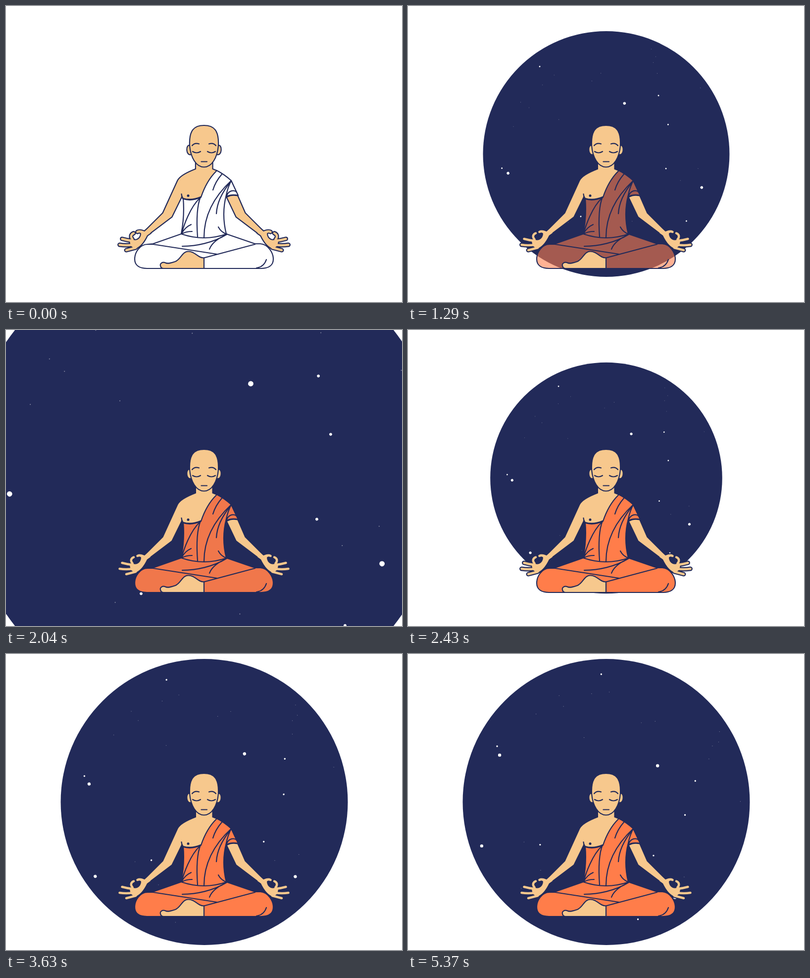
These frames come from a looping animation (800x600 px, 5400 ms). An HTML page:

```html
<!DOCTYPE html>
<html lang="en">
<head>
<meta charset="utf-8">
<title>Meditation</title>
<style>
html, body { margin: 0; width: 100%; height: 100%; overflow: hidden; background: #fff; }
svg { display: block; width: 800px; height: 600px; stroke-linecap: round; stroke-linejoin: round; }
.line { fill: none; stroke: #222a59; stroke-width: 2.2; }
.skin { fill: #f7c88d; stroke: #222a59; stroke-width: 2.2; }
</style>
</head>
<body>
<svg viewBox="0 0 800 600">
  <defs>
    <path id="palm" d="M286 452 L280 457 Q272 454 267 456.500 L273 461 Q273 470 265 474 Q258 476 254 472 L250 477 L252 486 L260 492 Q274 488 285 465 L292 460Z"/>
    <g id="limbs">
      <path d="M384 316 V331 Q353 343 347.500 354 L317.500 420 L281 456.500 L285 464.500 L334.500 427 L354 387 L355 381 L358 390 Q375 395 393 387 Q404 354 424 334 L416.500 331 V316Z"/>
      <path d="M447 388 Q456 383 467.500 385.500 L482.500 420 L519 456.500 L515 464.500 L465.500 427Z"/>
      <use href="#palm"/>
      <use href="#palm" transform="matrix(-1 0 0 1 800 0)"/>
    </g>
    <path id="hand" d="M265.500 458 Q271 455 279 460 M258 460.500 C251.500 463 251.500 469 255.500 473 M256 476 Q245 475 234.500 472 M256 484 Q243 486 229.500 484 M262 490 L243 495"/>
    <g id="fingers" fill="none">
      <use href="#hand"/>
      <use href="#hand" transform="matrix(-1 0 0 1 800 0)"/>
    </g>
    <path id="ear" d="M373 283 C367 280.500 365 286 365.300 292 C365.700 298 369 303 374 301"/>
    <path id="face" d="M376 283 Q381 276.500 390 279.500 M377 295 Q385 300 393 295"/>
    <path id="robe" d="M425 333 Q441 341 455 354 L469 384 Q456 381 446 386 L445 383 Q435 422 445 462 L503 482 L514 482 C530 483 540 501 540 513 C540 526 530 532 515 532 H285 C270 532 260 526 260 513 C260 500 270 483 286 483 L297 482 L354 462 Q361 425 358 390 Q375 395 393 387 Q404 353 425 333Z"/>
  </defs>

  <g id="sky">
    <circle r="290" fill="#222a59"/>
    <g id="stars" fill="#fff"></g>
  </g>

  <use id="cloth" href="#robe" fill="#ff7d4a"/>
  <g class="line">
    <use href="#robe"/>
    <path d="M436 341 Q423 356 418 373 M455 354 C425 382 400 420 400 469 M393 387 C385 407 385 440 387 468"/>
    <path d="M454 356 C436 378 426 400 425 421 M455 354 Q448 368 445 383 M446 384 C450 374 460 372 466 377"/>
    <path d="M391 390 C372 408 359 445 355 461 M374 443 Q362 448 355 461 M376 457 Q363 457 355 462 M429 448 Q434 458 445 462"/>
    <path d="M354 462 Q400 478 446 462 M356 487 C384 487 418 480 446 463 M411 493 Q417 476 446 463"/>
    <path d="M286 483 L297 483 L426 503 M503 483 L400 510.500 M526 514 Q521 529 506 531"/>
  </g>
  <path class="skin" d="M400 532 V510.500 C387 511 383 497.500 368 497.500 C356 497.500 353 514 342 518 C333 521 326 523 322 520.500 C316 518 310.500 522 312 526.500 Q313 532 318 532Z"/>

  <g stroke="#222a59" fill="#222a59">
    <use href="#limbs" stroke-width="4.400"/>
    <use href="#fingers" stroke-width="8.900"/>
  </g>
  <g fill="#f7c88d">
    <use href="#limbs"/>
    <use href="#fingers" stroke="#f7c88d" stroke-width="4.500"/>
  </g>
  <path class="line" d="M354.500 381 Q355 387 358 390 Q375 395 393 387"/>
  <circle cx="368" cy="384.500" r="2.500" fill="#222a59"/>

  <g class="skin">
    <use href="#ear"/>
    <use href="#ear" transform="matrix(-1 0 0 1 800 0)"/>
    <path d="M371 283 C369.500 252 380 242 400 242 C420 242 430.500 252 429 283 C427 307 416 326.500 400 326.500 C384 326.500 373 307 371 283Z"/>
  </g>
  <g class="line">
    <use href="#face"/>
    <use href="#face" transform="matrix(-1 0 0 1 800 0)"/>
    <path d="M394.500 315.500 H406"/>
  </g>
</svg>
<script>
const LOOP = 5400, SIZE = 290;
const get = id => document.getElementById(id);
const sky = get('sky'), stars = get('stars'), cloth = get('cloth');

let seed = 7;
const random = () => (seed = seed * 16807 % 2147483647) / 2147483647;
const dot = (x, y, r, a) => `<circle cx="${x}" cy="${y}" r="${r}" opacity="${a}"/>`;

// positions relative to the centre of the sky
const large = [[-215, -96], [104, -73], [-252, 88], [138, 194]];
const small = [[-9, -259], [-220, -114], [180, -42], [159, 27], [95, 109], [-134, 86], [63, 238]];
let dots = large.map(([x, y]) => dot(x, y, 3.2, 1)).join('') +
  small.map(([x, y]) => dot(x, y, 1.7, 1)).join('');
for (let i = 0; i < 20; i++) {
  const angle = random() * 2 * Math.PI, r = 280 * Math.sqrt(0.2 + 0.8 * random());
  dots += dot(r * Math.cos(angle), r * Math.sin(angle), 0.6, 0.45);
}
stars.innerHTML = dots;

const easeOut = u => u * (2 - u);
const easeInOut = u => (1 - Math.cos(Math.PI * u)) / 2;

// progress of a step that runs from time a to time b
const step = (t, a, b, ease) => ease(Math.min(1, Math.max(0, (t - a) / (b - a))));

// the sky bursts open, shrinks past its resting size and settles
const radius = t =>
  486 * step(t, 1110, 1710, easeOut) -
  259 * step(t, 2190, 2460, easeInOut) +
  (SIZE - 227) * step(t, 2460, 2850, easeInOut);

function draw(t) {
  sky.setAttribute('transform', `translate(400.5 300) scale(${radius(t) / SIZE})`);
  stars.setAttribute('transform', `rotate(${(t - LOOP) * 0.00856})`);
  cloth.setAttribute('opacity', Math.min(1, t / 2190));
}

const start = performance.now();
function tick() {
  draw((performance.now() - start) % LOOP);
  requestAnimationFrame(tick);
}
draw(0);
requestAnimationFrame(tick);
</script>
</body>
</html>
```
